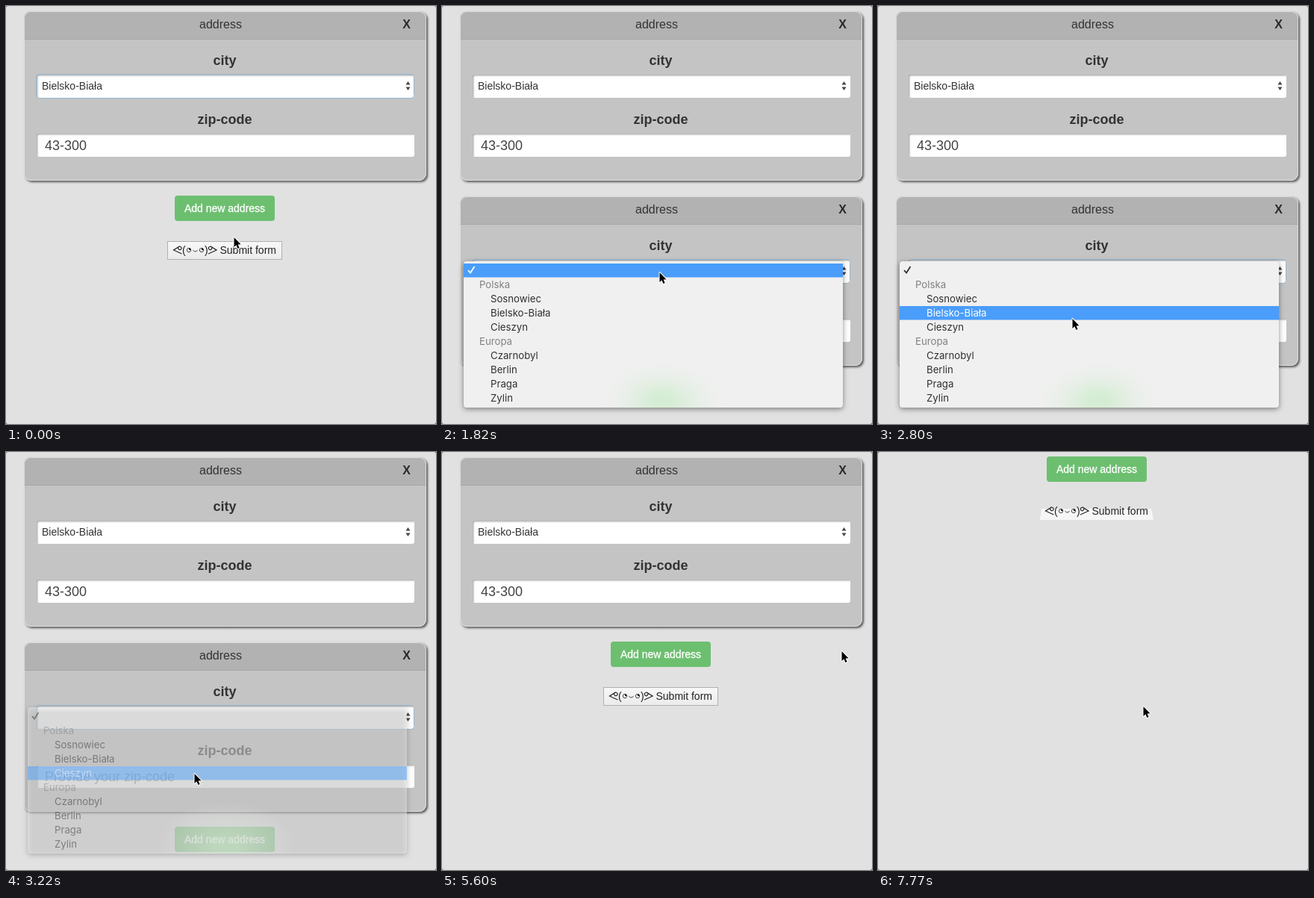
An HTML page with a canvas that plays this animation: 576x560 px, repeating every 7840 ms.

```html
<!DOCTYPE html>
<html lang="en">
<head>
<meta charset="utf-8">
<title>Address form</title>
<style>
html, body { margin: 0; width: 100%; height: 100%; overflow: hidden; background: #e1e1e1; }
canvas { display: block; width: 576px; height: 560px; }
</style>
</head>
<body>
<canvas id="stage" width="576" height="560"></canvas>
<script>
const ctx = document.getElementById('stage').getContext('2d');
const LOOP = 7840, STEP = 70, PITCH = 248;
const SANS = '"Liberation Sans", Arial, sans-serif';
const MENU_FONT = '13.2px Inter, Roboto, sans-serif';

const ADD = 630, OPEN = 1750, FADE = 3150, CLOSED = 3290, DROP2 = 5320, DROP1 = 6930;

// time, x, y of the pointer
const PATH = [
  [0, 305, 309], [70, 305, 309], [350, 312, 273], [980, 312, 273],
  [1540, 291, 356], [1820, 291, 356], [2170, 291, 369], [2450, 291, 369],
  [2940, 252, 430], [3430, 252, 430], [4130, 420, 508], [4270, 420, 508],
  [4550, 536, 204], [4690, 532, 238], [5040, 535, 266], [5740, 535, 266],
  [6300, 556, 4], [6440, 556, 4], [6510, 543, 9], [6720, 540, 17],
  [7560, 540, 17], [7770, 355, 340], [7840, 355, 340]
];

const MENU = [
  ['', 0], ['Polska', 1], ['Sosnowiec', 0], ['Bielsko-Biała', 0], ['Cieszyn', 0],
  ['Europa', 1], ['Czarnobyl', 0], ['Berlin', 0], ['Praga', 0], ['Zylin', 0]
];

function pointerAt(t) {
  let i = 1;
  while (i < PATH.length - 1 && PATH[i][0] < t) i++;
  const [t0, x0, y0] = PATH[i - 1], [t1, x1, y1] = PATH[i];
  const p = Math.min(1, (t - t0) / (t1 - t0));
  const e = p * p * (3 - 2 * p);
  return { x: x0 + (x1 - x0) * e, y: y0 + (y1 - y0) * e };
}

const inside = (p, x, y, w, h) => p.x >= x && p.x <= x + w && p.y >= y && p.y <= y + h;

function text(s, x, y, font, color, align = 'left') {
  ctx.font = font;
  ctx.fillStyle = color;
  ctx.textAlign = align;
  ctx.fillText(s, x, y);
}

function box(x, y, w, h, r) {
  ctx.beginPath();
  ctx.roundRect(x, y, w, h, r);
}

function poly(points) {
  ctx.beginPath();
  points.forEach(([x, y]) => ctx.lineTo(x, y));
  ctx.closePath();
}

function shadow(color, blur, dx, dy) {
  ctx.shadowColor = color;
  ctx.shadowBlur = blur;
  ctx.shadowOffsetX = dx;
  ctx.shadowOffsetY = dy;
}

function field(y, focused) {
  ctx.save();
  box(41, y, 506, 31, 3);
  ctx.fillStyle = '#fff';
  ctx.fill();
  ctx.clip();
  // inset shading along the top and left edges
  shadow('rgba(0,0,0,.55)', 3, 1, 1);
  ctx.lineWidth = 4;
  ctx.strokeStyle = '#999';
  box(38.5, y - 2.5, 514, 40, 4);
  ctx.stroke();
  ctx.restore();
  if (focused) {
    ctx.strokeStyle = '#93b7d2';
    ctx.lineWidth = 1;
    box(40.5, y - 0.5, 506, 32, 4);
    ctx.stroke();
  }
}

function card(top, city, zip, focused) {
  ctx.save();
  shadow('rgba(0,0,0,.6)', 3, 2, 2);
  box(24, top, 539, 227, 9);
  ctx.fillStyle = '#c4c4c4';
  ctx.fill();
  ctx.restore();

  ctx.save();
  box(24, top, 539, 227, 9);
  ctx.clip();
  ctx.fillStyle = '#b2b2b2';
  ctx.fillRect(24, top, 539, 37);
  ctx.fillStyle = '#a6a6a6';
  ctx.fillRect(24, top + 37, 539, 1);
  ctx.restore();
  ctx.strokeStyle = 'rgba(238,238,238,.7)';
  ctx.lineWidth = 1;
  box(24.5, top + 0.5, 538, 226, 9);
  ctx.stroke();

  text('address', 287.5, top + 23, '16px ' + SANS, '#333', 'center');
  text('X', 536.5, top + 23, 'bold 16px ' + SANS, '#2a2a2a', 'center');
  text('city', 293, top + 72, 'bold 18px ' + SANS, '#333', 'center');
  text('zip-code', 293, top + 151, 'bold 18px ' + SANS, '#333', 'center');

  field(top + 85, focused);
  text(city, 48, top + 105, '14px ' + SANS, '#333');
  ctx.fillStyle = '#444';
  const mid = top + 100;
  for (const d of [-1, 1]) {
    poly([[535.5, mid + d * 1.5], [541.5, mid + d * 1.5], [538.5, mid + d * 6]]);
    ctx.fill();
  }
  field(top + 164, false);
  text(zip || 'Provide your zip-code', 52, top + 186, '18px ' + SANS, zip ? '#444' : '#999');
}

function addButton(y, focused, hover) {
  if (focused) {
    ctx.save();
    shadow('#5aa0e0', 3, 0, 0);
    box(225, y - 1, 136, 36, 4);
    ctx.fillStyle = '#69a9d6';
    ctx.fill();
    ctx.restore();
  }
  box(226, y, 134, 34, 4);
  ctx.fillStyle = focused || hover ? '#54a658' : '#6dbf70';
  ctx.fill();
  text('Add new address', 293, y + 22, '14px ' + SANS, '#fff', 'center');
  ctx.strokeStyle = '#fff';
  ctx.lineWidth = 0.3;
  ctx.strokeText('Add new address', 293, y + 22);
}

function arm(x, y, dir) {
  const at = (dx, dy) => [x + dir * dx, y + dy];
  ctx.beginPath();
  ctx.moveTo(...at(11, 5));
  ctx.lineTo(...at(0, 0));
  ctx.lineTo(...at(8, -5));
  ctx.quadraticCurveTo(...at(12, -4), ...at(10, -1));
  ctx.quadraticCurveTo(...at(7, 1), ...at(6, -3));
  ctx.stroke();
}

function eye(x, y) {
  ctx.lineWidth = 0.8;
  ctx.beginPath();
  ctx.arc(x, y, 2.7, 0, 7);
  ctx.stroke();
  ctx.beginPath();
  ctx.moveTo(x, y);
  ctx.arc(x, y, 2.7, -Math.PI / 2, 0);
  ctx.fill();
}

function submitButton(y, framed) {
  if (framed) {
    const g = ctx.createLinearGradient(0, y, 0, y + 24);
    g.addColorStop(0, '#f8f8f8');
    g.addColorStop(1, '#ebebeb');
    ctx.fillStyle = g;
    ctx.fillRect(216, y, 154, 24);
    ctx.strokeStyle = '#b0b0b0';
    ctx.lineWidth = 1;
    ctx.strokeRect(216.5, y - 0.5, 153, 24);
  } else {
    poly([[219, y + 8], [366, y + 8], [369, y + 23], [217, y + 23]]);
    ctx.fillStyle = '#f6f6f6';
    ctx.fill();
  }
  const mid = y + 11;
  text('Submit form', 286.5, y + 16, '14px ' + SANS, '#222');
  text('(', 236, y + 16, '14px ' + SANS, '#222');
  text(')', 266, y + 16, '14px ' + SANS, '#222');
  ctx.strokeStyle = ctx.fillStyle = '#222';
  ctx.lineWidth = 1.2;
  arm(224.5, mid, 1);
  arm(282, mid, -1);
  eye(245, mid);
  eye(262, mid);
  ctx.beginPath();
  ctx.arc(253.5, mid - 1, 3, 0.3, Math.PI - 0.3);
  ctx.stroke();
}

function menu(row, alpha) {
  ctx.save();
  ctx.globalAlpha = alpha;
  ctx.save();
  shadow('rgba(0,0,0,.45)', 7, 0, 2);
  box(29, 342, 508, 196, 4);
  ctx.fillStyle = '#f0f0f0';
  ctx.fill();
  ctx.restore();

  ctx.save();
  box(29, 342, 508, 196, 4);
  ctx.clip();
  ctx.translate(295, 530);
  ctx.scale(1.5, 1);
  const glow = ctx.createRadialGradient(0, 0, 10, 0, 0, 62);
  glow.addColorStop(0, '#d6edd5');
  glow.addColorStop(1, 'rgba(240,240,240,0)');
  ctx.fillStyle = glow;
  ctx.fillRect(-70, -70, 140, 90);
  ctx.restore();

  ctx.fillStyle = '#4a9dfa';
  ctx.fillRect(29, 345 + row * 19, 508, 18.5);
  MENU.forEach(([label, group], i) => {
    const color = i === row ? '#fff' : group ? '#808080' : '#303030';
    text(label, group ? 50 : 65, 358 + i * 19 + 0.5, MENU_FONT, color);
  });
  ctx.strokeStyle = row === 0 ? '#fff' : '#303030';
  ctx.lineWidth = 1.8;
  ctx.beginPath();
  ctx.moveTo(35, 354);
  ctx.lineTo(38, 357.5);
  ctx.lineTo(43.5, 349);
  ctx.stroke();
  ctx.restore();
}

function outlined() {
  ctx.lineJoin = 'round';
  ctx.strokeStyle = '#fff';
  ctx.lineWidth = 2;
  ctx.stroke();
  ctx.fillStyle = '#000';
  ctx.fill();
}

const shapes = {
  arrow() {
    poly([[0.5, 1], [0.5, 14], [3.4, 11.2], [5.4, 16], [7.6, 15], [5.6, 10.4], [9.5, 10.2]]);
    outlined();
  },
  beam() {
    ctx.beginPath();
    for (const d of [-1, 1]) {
      ctx.moveTo(-3, d * 7.5);
      ctx.quadraticCurveTo(0, d * 7.5, 0, d * 5);
      ctx.quadraticCurveTo(0, d * 7.5, 3, d * 7.5);
    }
    ctx.moveTo(0, -6);
    ctx.lineTo(0, 6);
    ctx.moveTo(-2, 3);
    ctx.lineTo(2, 3);
    for (const [w, c] of [[2.6, 'rgba(255,255,255,.7)'], [1.2, '#111']]) {
      ctx.lineWidth = w;
      ctx.strokeStyle = c;
      ctx.stroke();
    }
  },
  hand() {
    poly([[-1, 0], [1, 0], [1.5, 5], [8, 7], [8, 11], [6, 16], [-2, 16], [-6, 9], [-4, 8], [-1.5, 10]]);
    ctx.lineJoin = 'round';
    ctx.strokeStyle = '#000';
    ctx.lineWidth = 2;
    ctx.stroke();
    ctx.fillStyle = '#fff';
    ctx.fill();
  }
};

function pointerShape(p, cards, menuOpen) {
  if (menuOpen) return 'arrow';
  if (inside(p, 226, 6 + cards * PITCH, 134, 34)) return 'hand';
  for (let i = 0; i < cards; i++) {
    const y = 7 + i * PITCH;
    if (inside(p, 259, y + 8, 57, 20) || inside(p, 278, y + 56, 30, 20) ||
        inside(p, 256, y + 135, 73, 20) || inside(p, 41, y + 164, 506, 31)) return 'beam';
  }
  return 'arrow';
}

function corners() {
  ctx.beginPath();
  ctx.rect(0, 0, 576, 560);
  ctx.roundRect(0, 0, 576, 560, 3);
  ctx.fillStyle = '#777';
  ctx.fill('evenodd');
}

function draw(t) {
  const p = pointerAt(t);
  const cards = t < ADD ? 1 : t < DROP2 ? 2 : t < DROP1 ? 1 : 0;
  const menuOpen = t >= OPEN && t < CLOSED;
  const picked = t >= CLOSED;

  ctx.fillStyle = '#e1e1e1';
  ctx.fillRect(0, 0, 576, 560);
  if (cards > 0) card(7, 'Bielsko-Biała', '43-300', t < 560);
  if (cards > 1) card(7 + PITCH, picked ? 'Cieszyn' : '', picked ? '43-400' : '', t >= 1680);

  const y = 6 + cards * PITCH;
  addButton(y, t >= 560 && t < 1680, inside(p, 226, y, 134, 34));
  submitButton(y + 62, cards > 0);

  if (menuOpen) {
    let row = Math.max(0, Math.floor((p.y - 344.5) / 19));
    if (MENU[row][1]) row--;
    menu(row, t < FADE ? 1 : Math.max(0, 1 - (t - FADE) / 140));
  }
  corners();

  ctx.save();
  ctx.translate(Math.round(p.x), Math.round(p.y));
  shapes[pointerShape(p, cards, menuOpen)]();
  ctx.restore();
}

const start = performance.now();
function tick() {
  const t = (performance.now() - start) % LOOP;
  draw(Math.floor(t / STEP) * STEP);
  requestAnimationFrame(tick);
}
tick();
</script>
</body>
</html>
```
